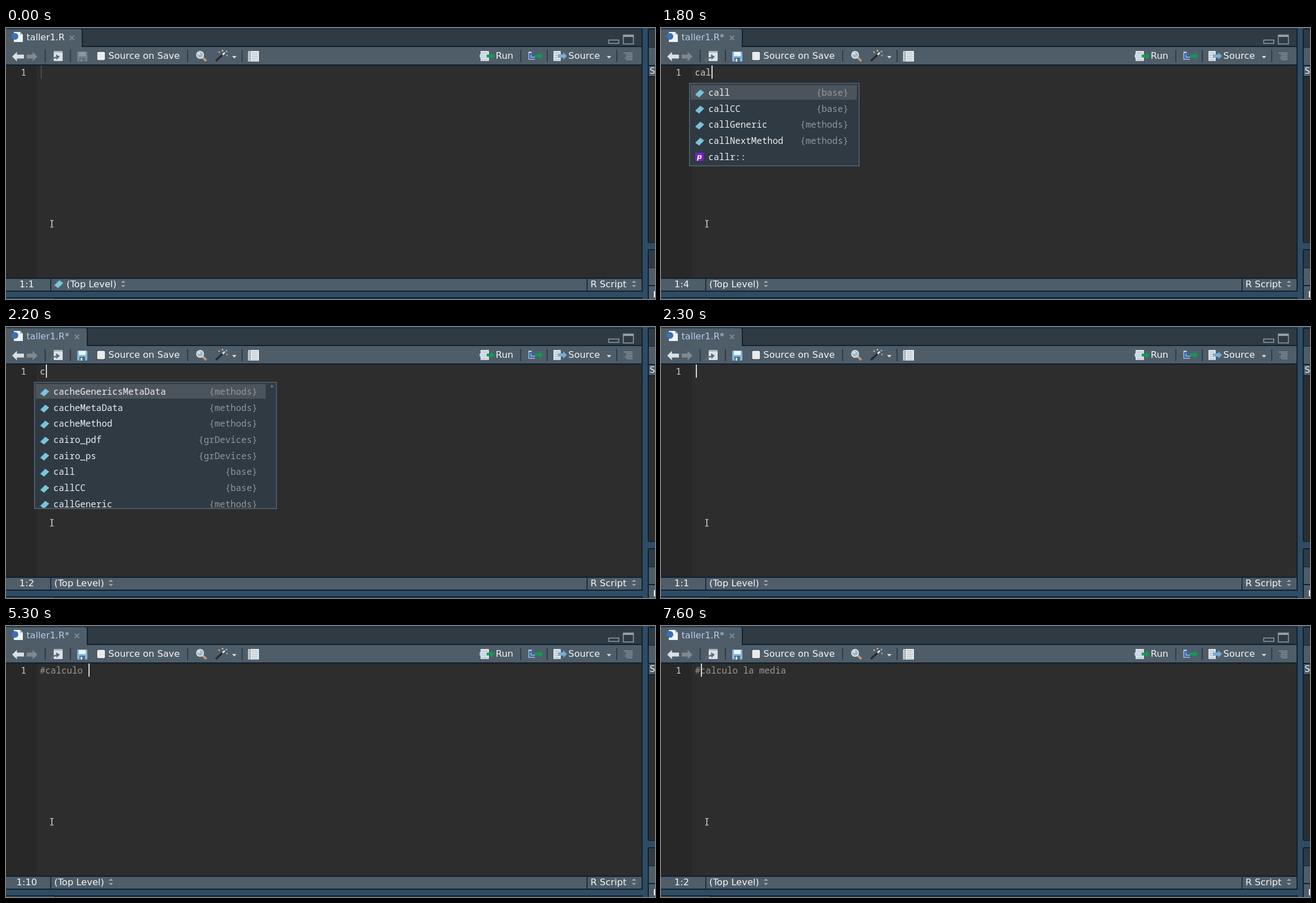
Animation of 1157 by 484 pixels, one loop 8000 ms. Source, as an HTML page with a canvas:

```html
<!DOCTYPE html>
<html lang="es">
<head>
<meta charset="utf-8">
<title>Editor</title>
<style>
html, body { margin: 0; width: 100%; height: 100%; overflow: hidden; background: #2f4c64; }
canvas { display: block; }
</style>
</head>
<body>
<canvas id="stage" width="1157" height="484"></canvas>
<script>
const g = document.getElementById('stage').getContext('2d');
const LOOP = 8000;
const UI = '"DejaVu Sans", sans-serif';
const MONO = '15.92px "Noto Sans Mono", monospace';
const CHAR = 9.55;
const C = {
  back: '#2f4c64', bar: '#4f5d68', dark: '#2f3a43', edge: '#0b2132',
  page: '#2d2d2d', gutter: '#282828', white: '#f4f5f6', code: '#cccccc',
  comment: '#999999', cyan: '#78c4da', green: '#159a52', blue: '#79acd2'
};
const LINE = '#calculo la media';

const short = [['call', 'base'], ['callCC', 'base'], ['callGeneric', 'methods'],
  ['callNextMethod', 'methods'], ['callr::', '']];
const long = [['cacheGenericsMetaData', 'methods'], ['cacheMetaData', 'methods'],
  ['cacheMethod', 'methods'], ['cairo_pdf', 'grDevices'], ['cairo_ps', 'grDevices'],
  ['call', 'base'], ['callCC', 'base'], ['callGeneric', 'methods']];
const popups = {
  cal: { rows: short, right: 354, bottom: 246, inset: 5 },
  ca: { rows: long, right: 463, bottom: 324, inset: 20 },
  c: { rows: long, right: 483, bottom: 324, inset: 20 }
};

// time, text, popup, caret column (end of text by default), caret hidden
const steps = [
  [0, '', 0, 0, 1], [400, ''], [900, '', 0, 0, 1],
  [1300, 'c'], [1400, 'ca'], [1500, 'cal'],
  [1800, 'cal', 'cal'], [1900, 'ca', 'ca'], [2100, 'c', 'ca'], [2200, 'c', 'c'], [2300, '']
];
const type = (t, n) => steps.push([t, LINE.slice(0, n)]);
[[2900, 1], [3200, 2], [3400, 3], [3500, 4]].forEach(s => type(...s));
steps.push([4000, '#cal', 0, 4, 1]);
[[4100, 5], [4300, 6], [4500, 7], [4700, 8], [5300, 9], [5500, 10], [5600, 11],
  [5800, 12], [6000, 13], [6100, 14], [6300, 16], [6600, 17]].forEach(s => type(...s));
steps.push([7200, LINE, 0, 17, 1], [7300, LINE, 0, 0], [7600, LINE, 0, 1]);

function rect(x, y, w, h, color) {
  g.fillStyle = color;
  g.fillRect(x, y, w, h);
}
function round(x, y, w, h, r, color) {
  g.fillStyle = color;
  g.beginPath();
  g.roundRect(x, y, w, h, r);
  g.fill();
}
function poly(color, ...p) {
  g.fillStyle = color;
  g.beginPath();
  for (let i = 0; i < p.length; i += 2) g.lineTo(p[i], p[i + 1]);
  g.closePath();
  g.fill();
}
function stroke(color, width, ...p) {
  g.strokeStyle = color;
  g.lineWidth = width;
  g.beginPath();
  for (let i = 0; i < p.length; i += 2) g.lineTo(p[i], p[i + 1]);
  g.stroke();
}
function disc(x, y, r, color) {
  g.fillStyle = color;
  g.beginPath();
  g.arc(x, y, r, 0, 7);
  g.fill();
}
function text(s, x, y, color, font, align = 'left') {
  g.font = font;
  g.fillStyle = color;
  g.textAlign = align;
  g.fillText(s, x, y);
}
const label = (s, x, y, color = C.white, size = 16.4, align) =>
  text(s, x, y, color, `${size}px ${UI}`, align);

// Arrow pointing right from x0 to x1; left when x1 < x0
function arrow(x0, x1, y, half, shaft, color) {
  const neck = x1 - Math.sign(x1 - x0) * half;
  poly(color, x0, y - shaft, neck, y - shaft, neck, y - half, x1, y,
    neck, y + half, neck, y + shaft, x0, y + shaft);
}
function gem(x, y) {
  poly(C.cyan, x - 8, y + 2, x + 1, y - 7, x + 8, y - 2, x - 1, y + 7);
}
function separator(x) {
  rect(x, 39, 1.5, 22, '#22323f');
}
function sorter(x) {
  poly('#9ba4ab', x - 4, 455, x, 451, x + 4, 455);
  poly('#9ba4ab', x - 4, 459, x, 463, x + 4, 459);
}
function sheet(x, w) {
  round(x, 41, w, 18, 1, '#dfe5ea');
  for (let y = 44; y < 58; y += 4) rect(x + 2, y, w - 4, 1.5, '#b5c0c9');
}

function frame() {
  rect(0, 0, 1157, 484, C.back);
  rect(0, 1, 1135, 470, C.edge);
  rect(0, 2, 1133, 30, C.dark);
  rect(0, 34, 1133, 31, C.bar);
  rect(0, 67, 1133, 379, C.page);
  rect(0, 67, 55, 379, C.gutter);
  rect(0, 448, 1133, 21, C.bar);
  rect(79, 447, 1.5, 23, C.edge);
  rect(1035, 447, 1.5, 23, C.edge);
  // Neighbouring panes
  rect(0, 481, 1135, 3, C.edge);
  rect(0, 483, 87, 1, C.bar);
  rect(89, 483, 1044, 1, C.dark);
  round(1144, 1, 20, 383, 3, C.edge);
  rect(1146, 3, 11, 31, C.dark);
  rect(1146, 35, 11, 31, C.bar);
  rect(1146, 68, 11, 18, C.bar);
  rect(1146, 88, 11, 295, C.page);
  label('S', 1147.5, 82, C.white, 15);
  round(1144, 395, 20, 95, 3, C.edge);
  rect(1146, 397, 11, 31, C.dark);
  rect(1146, 429, 11, 30, C.bar);
  rect(1146, 461, 11, 23, C.bar);
  rect(1155, 470, 2, 11, C.white);
}

function tab(dirty) {
  const right = dirty ? 144 : 135;
  round(0, 1, right + 2, 33, [0, 4, 0, 0], C.edge);
  round(0, 2, right, 34, [0, 3, 0, 0], C.bar);
  poly('#f1f4f7', 14, 7, 25, 7, 30, 12, 30, 25, 14, 25);
  poly('#b4c3d0', 25, 7, 30, 12, 25, 12);
  disc(16, 15, 6, '#3b70b5');
  label(dirty ? 'taller1.R*' : 'taller1.R', 36.5, 22, dirty ? '#b4cbe9' : C.white, 16.1);
  const x = right - 17.5;
  stroke('#7f8b94', 2, x - 4, 13.5, x + 4, 21.5);
  stroke('#7f8b94', 2, x - 4, 21.5, x + 4, 13.5);
}

function toolbar(dirty) {
  // Window buttons
  g.strokeStyle = '#93a0aa';
  g.lineWidth = 1.5;
  g.strokeRect(1074.5, 21.5, 18, 6);
  g.strokeRect(1100.5, 12.5, 18, 16);
  rect(1101, 13, 17, 3, '#93a0aa');

  arrow(32, 11, 51, 8.5, 3.5, '#dce0e3');
  arrow(37, 56, 51, 8.5, 3.5, '#7e8990');
  [69, 114, 323, 420, 917, 964, 1088].forEach(separator);

  round(85, 41, 16, 18, 1, '#dce2e7');
  rect(85, 41, 16, 3, '#aebac4');
  stroke('#5d6d7a', 2.5, 79, 59, 84, 54, 92, 52);
  poly('#5d6d7a', 89, 47, 96, 51, 90, 57);

  const body = dirty ? '#87b9dc' : '#70838f';
  round(127, 42, 18, 18, 2, body);
  rect(130, 43, 12, 7, dirty ? '#eef4f8' : '#8b989f');
  rect(131, 53, 10, 7, dirty ? '#476f8c' : '#5b6b76');
  rect(133, 55, 3, 5, dirty ? '#dfeaf2' : '#81909a');

  round(161.5, 41.5, 16, 17, 3, '#2b3943');
  round(162.5, 42.5, 14, 15, 2, '#e9ebec');
  label('Source on Save', 182.5, 55);

  stroke('#bd9a72', 4, 350, 52, 357, 59);
  disc(346, 48, 7, '#dbe4ea');
  disc(346, 48, 5, '#9db8cb');
  disc(344.5, 46, 2, '#dce9f1');

  stroke('#222c35', 3.5, 374, 59, 389, 45);
  stroke('#e8eaec', 3, 386, 48, 390, 44);
  disc(380, 43, 1.6, '#c79fd5');
  disc(386, 40.5, 1.4, '#e6c46c');
  disc(393, 42, 1.6, '#80b5e0');
  disc(394, 49, 1.5, '#e1955d');
  poly('#d5dade', 403, 50, 411, 50, 407, 54.5);

  round(432, 41, 19, 19, 1, '#e7ebed');
  rect(434, 41, 2, 19, '#8e9ba5');
  for (let y = 44; y < 59; y += 3.5) {
    rect(438, y, 11, 1, '#a5b1b9');
    rect(430.5, y, 4, 1.2, '#bcc6cd');
  }

  sheet(846, 15);
  rect(844.5, 47, 14, 6, '#c9dbe8');
  arrow(857, 871, 50, 6, 2.5, C.green);
  label('Run', 873, 55);

  stroke('#e2e9ef', 5, 943, 54, 934, 54, 934, 45, 939, 45);
  stroke('#3367b0', 3, 943, 54, 934, 54, 934, 46, 938, 46);
  poly('#3367b0', 937, 41, 943, 46, 937, 50);
  arrow(943, 957, 50, 6, 2.5, C.green);

  sheet(976, 13);
  arrow(984, 1000, 50, 6.5, 3, C.blue);
  label('Source', 1002.5, 55);
  poly('#d5dade', 1071, 50, 1079, 50, 1075, 54.5);
  for (let i = 0; i < 5; i++) {
    const inset = [0, 4, 4, 2, 5][i];
    rect(1101 + inset, 44 + i * 3, 16 - inset, 1.3, '#929da5');
  }
}

function status(column, dirty) {
  label('1:' + (column + 1), 37, 463, C.white, 16.4, 'center');
  const x = dirty ? 86 : 108;
  if (!dirty) gem(94, 457.5);
  label('(Top Level)', x, 463);
  sorter(x + 101);
  label('R Script', 1042, 463);
  sorter(1119.5);
}

function popup({ rows, right, bottom, inset }) {
  rect(50, 98, right - 50, bottom - 98 + 1, '#526777');
  rect(51.5, 99.5, right - 53, bottom - 100, C.dark);
  g.save();
  g.beginPath();
  g.rect(51, 99, right - 52, bottom - 100);
  g.clip();
  rect(53, 102, right - inset - 53, 26, '#4c545b');
  rows.forEach(([name, pack], i) => {
    const y = 121 + i * 28.65;
    if (pack) {
      gem(69, y - 4);
      text(`{${pack}}`, right - inset - 15, y, '#929799', MONO, 'right');
    } else {
      round(61, y - 13, 15, 15, 1, '#7420d0');
      text('p', 68.5, y - 2, '#ffffff', `italic bold 12px ${UI}`, 'center');
    }
    text(name, 84.5, y, '#eeeeee', MONO);
  });
  g.restore();
  if (inset > 5) disc(right - 9, 106, 2.5, '#586e7e');
}

function pointer() {
  rect(81, 344, 1.4, 11, '#e8e8e8');
  rect(79, 343, 2.2, 1.3, '#e8e8e8');
  rect(82.2, 343, 2.2, 1.3, '#e8e8e8');
  rect(79, 355, 2.2, 1.3, '#e8e8e8');
  rect(82.2, 355, 2.2, 1.3, '#e8e8e8');
}

function draw(time) {
  const [start, line, list, place, hidden] = steps.findLast(s => s[0] <= time);
  const column = place ?? line.length;
  const dirty = start >= 1300;
  frame();
  tab(dirty);
  toolbar(dirty);
  status(column, dirty);
  text('1', 26.5, 85, '#d6d6d6', MONO);
  text(line, 60.5, 85, line[0] === '#' ? C.comment : C.code, MONO);
  rect(Math.round(61.5 + column * CHAR), 67, hidden ? 1.5 : 2, 23.5, hidden ? '#565656' : '#dddddd');
  if (list) popup(popups[list]);
  pointer();
}

const origin = performance.now();
function tick() {
  draw((performance.now() - origin) % LOOP);
  requestAnimationFrame(tick);
}
tick();
</script>
</body>
</html>
```
